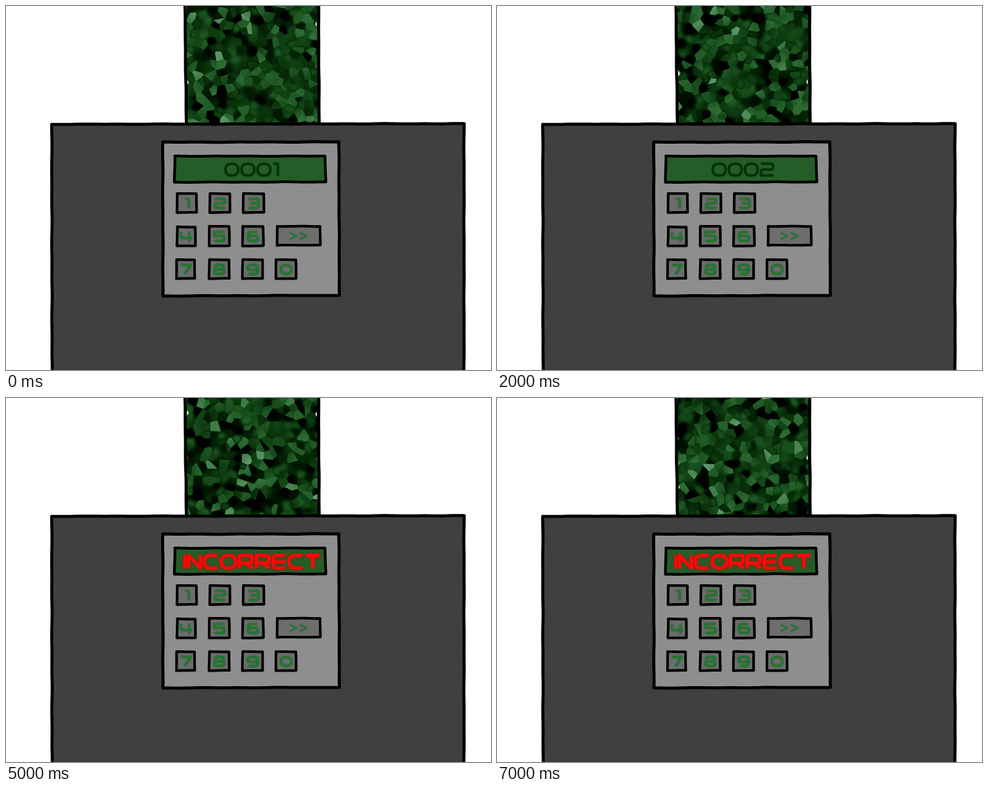
Animation of 800x600 px, one loop 8 s. Source, as an HTML page with a canvas:

```html
<!DOCTYPE html>
<html lang="en">
<head>
<meta charset="utf-8">
<title>Keypad</title>
<style>
html, body { margin: 0; width: 100%; height: 100%; overflow: hidden; background: #fff; }
canvas { display: block; }
</style>
</head>
<body>
<canvas id="stage" width="800" height="600" role="img" aria-label="Keypad trying the codes 0001 to 0004, each one INCORRECT"></canvas>
<script>
const ctx = document.getElementById('stage').getContext('2d');
const STEP = 1000;
const CODES = [['0001', 362], ['0002', 356], ['0003', 356], ['0004', 360]];

// Stroke font: [width, centre-line path], 20 units tall.
const GLYPHS = {
  0: [21, 'M10.5 0C18 0 21 3 21 10S18 20 10.5 20S0 17 0 10S3 0 10.5 0Z'],
  1: [7, 'M0 0H5Q7 0 7 2V20'],
  2: [20, 'M0 0H16Q20 0 20 4V6Q20 10 16 10H4Q0 10 0 14V20H20'],
  3: [20, 'M0 0H16Q20 0 20 4V6Q20 10 16 10H4M16 10Q20 10 20 14V16Q20 20 16 20H0'],
  4: [22, 'M0 0V9Q0 13 4 13H22M17 0V20'],
  5: [20, 'M20 0H0V9H16Q20 9 20 13V16Q20 20 16 20H0'],
  6: [20, 'M18 0H6Q0 0 0 6V14Q0 20 6 20H15Q20 20 20 16V13Q20 9 15 9H0'],
  7: [20, 'M0 0H20L8 20'],
  8: [20, 'M5 0H15Q19 0 19 5T15 10H5Q1 10 1 5T5 0ZM5 10H15Q20 10 20 15T15 20H5Q0 20 0 15T5 10Z'],
  9: [20, 'M2 20H14Q20 20 20 14V6Q20 0 14 0H5Q0 0 0 4V7Q0 11 5 11H20'],
  I: [0, 'M0 0V20'],
  N: [20, 'M0 20V0L20 20V0'],
  C: [22, 'M22 0H10Q0 0 0 10T10 20H22'],
  O: [24, 'M12 0C20 0 24 3 24 10S20 20 12 20S0 17 0 10S4 0 12 0Z'],
  R: [22, 'M0 20V0H17Q21 0 21 4V8Q21 12 17 12H0M10 12L22 20'],
  E: [20, 'M20 0H4Q0 0 0 4V16Q0 20 4 20H20M0 10H19'],
  T: [22, 'M0 0H22M11 0V20'],
  '>': [12, 'M0 0L12 10L0 20']
};

const KEYS = [
  ['1', 282, 309, 314, 340], ['2', 336, 309, 369, 340], ['3', 391, 309, 425, 340],
  ['4', 282, 364, 312, 395], ['5', 335, 363, 368, 395], ['6', 390, 363, 424, 395],
  ['7', 281, 418, 311, 449], ['8', 335, 418, 368, 449], ['9', 390, 418, 423, 449],
  ['0', 445, 418, 478, 449], ['>>', 447, 363, 518, 394]
];

function textPath(text, x, y, gap, sx = 1, sy = sx) {
  const path = new Path2D();
  for (const char of text) {
    const [width, shape] = GLYPHS[char];
    path.addPath(new Path2D(shape), new DOMMatrix([sx, 0, 0, sy, x, y]));
    x += (width + gap) * sx;
  }
  return path;
}

function strokeText(path, color, width, glow, blur) {
  ctx.save();
  ctx.strokeStyle = color;
  ctx.lineWidth = width;
  ctx.shadowColor = glow;
  ctx.shadowBlur = blur;
  ctx.stroke(path);
  ctx.restore();
}

// Polygon or line whose edges waver slightly as if drawn by hand.
function sketch(points, width, fill, closed = true) {
  const count = closed ? points.length : points.length - 1;
  ctx.beginPath();
  for (let i = 0; i < count; i++) {
    const [ax, ay] = points[i], [bx, by] = points[(i + 1) % points.length];
    const length = Math.hypot(bx - ax, by - ay);
    const amp = Math.min(.35, length / 120);
    for (let d = 0; d <= length; d += 6) {
      const off = amp * Math.sin(d / 13 + ax) * Math.cos(d / 41 + by);
      ctx.lineTo(ax + (bx - ax) * d / length - (by - ay) / length * off,
                 ay + (by - ay) * d / length + (bx - ax) / length * off);
    }
    ctx.lineTo(bx, by);
  }
  if (closed) ctx.closePath();
  if (fill) { ctx.fillStyle = fill; ctx.fill(); }
  ctx.strokeStyle = '#000';
  ctx.lineWidth = width;
  ctx.stroke();
}

function randomizer(seed) {
  return () => {
    seed = seed + 0x6D2B79F5 | 0;
    let n = Math.imul(seed ^ seed >>> 15, 1 | seed);
    n = n + Math.imul(n ^ n >>> 7, 61 | n) ^ n;
    return ((n ^ n >>> 14) >>> 0) / 4294967296;
  };
}

// Lit Voronoi facets scattered over a softly blended dark green ground.
function makeMosaic(seed) {
  const random = randomizer(seed), scale = 2, cell = 13;
  const width = 216, height = 194;
  const cols = Math.ceil(width / cell) + 4, rows = Math.ceil(height / cell) + 4;
  const sites = Array.from({ length: cols * rows }, (_, i) => {
    const angle = random() * Math.PI * 2, slope = .012 * random();
    const facet = random() < .44;
    const glint = random() < .13 ? .3 : 0;
    return {
      x: (i % cols - 2 + random()) * cell,
      y: (Math.floor(i / cols) - 2 + random()) * cell,
      facet,
      level: facet ? .3 + .4 * random() + glint : 0,
      shade: .5 * random(),
      dx: Math.cos(angle) * slope, dy: Math.sin(angle) * slope
    };
  });
  const tile = document.createElement('canvas');
  tile.width = width * scale;
  tile.height = height * scale;
  const tileCtx = tile.getContext('2d');
  const image = tileCtx.createImageData(tile.width, tile.height);
  for (let py = 0, k = 0; py < tile.height; py++) {
    for (let px = 0; px < tile.width; px++, k += 4) {
      const x = px / scale, y = py / scale;
      const col = Math.floor(x / cell) + 2, row = Math.floor(y / cell) + 2;
      let best = Infinity, site, total = 0, shade = 0;
      for (let j = row - 2; j <= Math.min(row + 2, rows - 1); j++) {
        for (let i = col - 2; i <= Math.min(col + 2, cols - 1); i++) {
          const s = sites[j * cols + i];
          const d = (s.x - x) ** 2 + (s.y - y) ** 2;
          if (d < best) { best = d; site = s; }
          const near = 1 / (1 + d / 50), weight = near * near * near;
          total += weight;
          shade += weight * s.shade;
        }
      }
      const ground = (shade / total - .25) * 1.6 + .23;
      const lit = site.level + (x - site.x) * site.dx + (y - site.y) * site.dy;
      const v = Math.max(0, site.facet ? lit : ground);
      image.data[k] = 98 * v ** 2.1;
      image.data[k + 1] = 153 * v;
      image.data[k + 2] = 108 * v ** 2;
      image.data[k + 3] = 255;
    }
  }
  tileCtx.putImageData(image, 0, 0);
  // Chips of background along the ragged sides.
  tileCtx.fillStyle = '#fff';
  for (const [edge, inner] of [[1, 7], [tile.width - 3, tile.width - 8]]) {
    const y = 40 + random() * 300;
    tileCtx.beginPath();
    tileCtx.moveTo(edge, y - 9);
    tileCtx.lineTo(inner, y);
    tileCtx.lineTo(edge, y + 9);
    tileCtx.fill();
  }
  return tile;
}

const mosaics = Array.from({ length: CODES.length * 2 }, (_, i) => makeMosaic(i * 77 + 5));

function draw(step) {
  ctx.fillStyle = '#fff';
  ctx.fillRect(0, 0, 800, 600);
  ctx.lineJoin = 'round';
  ctx.lineCap = 'butt';

  ctx.drawImage(mosaics[step], 298, 0, 216, 194);
  sketch([[295, -6], [297.5, 198]], 5, null, false);
  sketch([[515.5, -6], [516.5, 198]], 5, null, false);

  sketch([[75.5, 195], [755.5, 194], [755.5, 612], [76, 612]], 5, '#404040');
  sketch([[258.5, 224.5], [549, 224], [550, 477], [259, 478]], 5, '#8e8e8e');
  sketch([[278.5, 247.5], [526, 247.5], [527.5, 290], [278, 290.5]], 4.5, '#255d29');

  if (step % 2) {
    strokeText(textPath('INCORRECT', 295, 259.5, 6, 1, 1.05), '#ff0808', 5, 'rgba(210,0,0,.9)', 4);
  } else {
    const [code, x] = CODES[step / 2];
    strokeText(textPath(code, x, 260, 5.5, 1, .97), '#07300b', 3.8, 'rgba(7,48,11,.6)', 2);
  }

  for (const [label, x0, y0, x1, y1] of KEYS) {
    sketch([[x0 + .5, y0], [x1, y0 + .5], [x1 + .5, y1], [x0, y1 + .5]], 4.3, '#6d6d6d');
    const cx = (x0 + x1) / 2, cy = (y0 + y1) / 2;
    if (label === '>>') {
      strokeText(textPath(label, 468, 374, 5.3, .95, .54), '#1d7a2b', 2, 'rgba(20,70,25,.6)', 2);
    } else {
      const half = GLYPHS[label][0] * .41;
      strokeText(textPath(label, cx - half + .5, cy - 6.6, 0, .82, .74), '#1b7a29', 3, 'rgba(15,80,24,.8)', 3);
    }
  }
}

let shown = -1;
function tick(now) {
  const step = Math.floor(now / STEP) % mosaics.length;
  if (step !== shown) draw(shown = step);
  requestAnimationFrame(tick);
}
draw(shown = 0);
requestAnimationFrame(tick);
</script>
</body>
</html>
```
